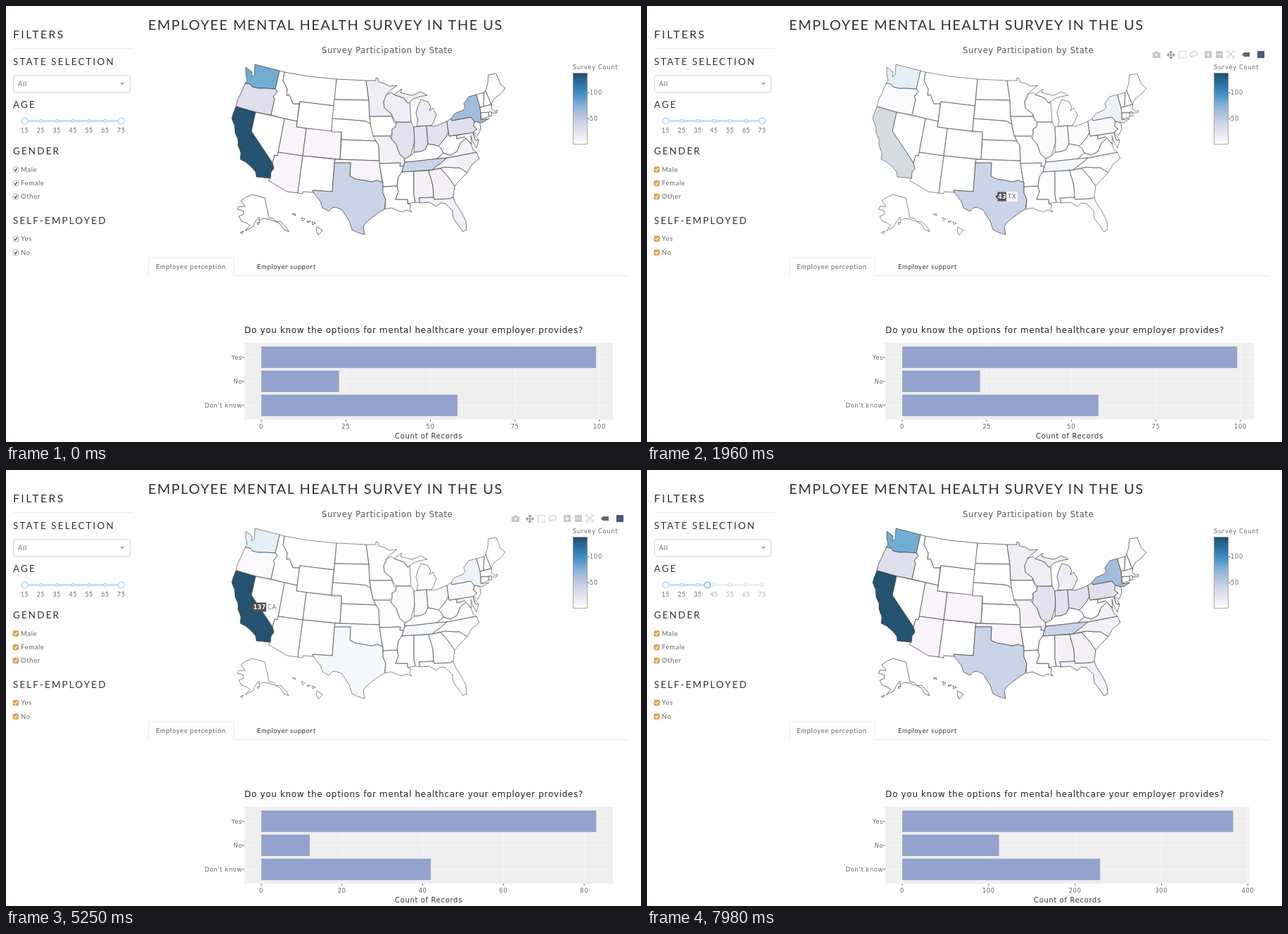
An HTML page for the animation above (8000 ms loop, 903 px wide and 620 px high).

```html
<!DOCTYPE html>
<html lang="en">
<head>
<meta charset="utf-8">
<title>Employee mental health survey</title>
<style>
  html, body { margin: 0; width: 100%; height: 100%; overflow: hidden; background: #fff; }
  svg { display: block; width: 903px; height: 620px; }
  text { font: 9.5px Lato, sans-serif; letter-spacing: .62px; fill: #666; }
  .title { font-size: 20px; letter-spacing: 1.48px; fill: #333; }
  .filters { font-size: 16px; letter-spacing: 2.3px; fill: #333; }
  .head { font-size: 13.5px; letter-spacing: 2.1px; fill: #333; }
  .mark { font-size: 8.5px; text-anchor: middle; }
  .plot, .plot text { font: 8.3px "DejaVu Sans", sans-serif; letter-spacing: .66px; }
  .plot .big { font-size: 12px; fill: #222; }
  .plot .mid { font-size: 10px; fill: #333; text-anchor: middle; }
  .end { text-anchor: end; }
  .center { text-anchor: middle; }
  #states { stroke: #444; stroke-width: .75; stroke-linejoin: round; fill: #fff; }
  #states .dim { stroke: #666; fill-opacity: .2; }
  .low { fill: #f8f4fa; }
  .some { fill: #f4f0f7; }
  .mild { fill: #efedf5; }
  .more { fill: #e3e1ef; }
  .high { fill: #c9d4e8; }
  #tools { fill: #c9c9c9; stroke: #c9c9c9; }
</style>
</head>
<body>
<svg viewBox="0 0 903 620">
  <defs>
    <linearGradient id="scale" x1="0" y1="1" x2="0" y2="0">
      <stop stop-color="#fff9fc"/><stop offset=".14" stop-color="#ece7f2"/>
      <stop offset=".3" stop-color="#cfd3e8"/><stop offset=".44" stop-color="#aac0dd"/>
      <stop offset=".58" stop-color="#78abd0"/><stop offset=".71" stop-color="#3f8fc1"/>
      <stop offset=".83" stop-color="#2d75a8"/><stop offset="1" stop-color="#1f4f6c"/>
    </linearGradient>
  </defs>

  <!-- Sidebar -->
  <text class="title" x="202" y="34">EMPLOYEE MENTAL HEALTH SURVEY IN THE US</text>
  <text class="filters" x="10" y="46">FILTERS</text>
  <path d="M10 60.5H181" stroke="#eee"/>
  <text class="head" x="10" y="84">STATE SELECTION</text>
  <rect x="10.5" y="98.5" width="166" height="24" rx="3" fill="#fff" stroke="#d4d4d4"/>
  <text x="17" y="113.5">All</text>
  <path d="M162 109h7l-3.500 3.500z" fill="#aaa"/>
  <text class="head" x="10" y="144.500">AGE</text>
  <g id="slider"></g>
  <text class="head" x="10" y="211">GENDER</text>
  <text class="head" x="10" y="309.500">SELF-EMPLOYED</text>
  <g id="checks"></g>

  <!-- Map -->
  <text class="plot" x="449" y="67" style="font-size:11.5px;fill:#555">Survey Participation by State</text>
  <g id="states">
    <path id="WA" fill="#70add1" d="M341 87 350 94 349 101 353 98 354 83 389 92 383 118 370 117 358 117 350 115 347 111 340 110 343 106 341 97z"/>
    <path id="OR" fill="#dfdeec" d="M340 110 347 111 350 115 358 117 370 117 383 118 386 122 380 129 382 132 377 155 355 151 327 143 329 134 334 124z"/>
    <path id="CA" fill="#235370" d="M327 143 355 151 349 178 379 223 381 231 377 236 376 245 356 243 355 236 349 229 341 222 333 218 334 209 330 198 330 190 326 181 325 170 321 160 323 153z"/>
    <path d="M355 151 396 160 387 209 386 213 382 212 379 223 349 178z"/>
    <path d="M389 92 396 94 394 106 400 118 399 127 403 126 408 139 417 139 414 164 396 160 377 155 382 132 380 129 386 122 383 118z"/>
    <path d="M396 94 430 100 470 104 467 142 418 136 417 139 408 139 403 126 399 127 400 118 394 106z"/>
    <path d="M418 136 467 142 463 179 413 172z"/>
    <path class="low" d="M396 160 414 164 413 172 427 174 422 213 387 208z"/>
    <path class="low" d="M427 174 477 179 475 218 422 213z"/>
    <path class="low" d="M387 208 422 213 415 266 400 264 373 248 376 245 377 236 381 231 379 223 382 212 386 213z"/>
    <path d="M422 213 468 218 467 223 464 264 436 262 437 265 422 264 422 267 415 266z"/>
    <path d="M470 104 512 106 516 134 467 133z"/>
    <path d="M467 133 516 134 517 157 519 168 512 164 505 163 464 160z"/>
    <path d="M464 160 505 163 512 164 519 168 522 182 526 192 477 190 477 179 463 179z"/>
    <path d="M477 190 526 192 530 198 531 220 475 218z"/>
    <path class="low" d="M468 218 531 220 532 230 535 251 528 248 519 250 509 248 497 246 489 242 490 223 467 223z"/>
    <path id="TX" class="high" d="M467 223 490 223 489 242 497 246 509 248 519 250 528 248 536 251 536 266 540 275 538 289 531 293 520 301 511 309 508 314 510 325 500 322 492 318 488 306 478 290 469 286 464 287 459 292 450 287 447 278 437 265 436 262 464 264z"/>
    <path class="mild" d="M512 106 526 106 526 102 529 103 530 108 538 110 545 114 556 113 548 119 541 126 541 131 537 136 538 145 549 154 549 157 517 157 516 134z"/>
    <path d="M517 157 549 157 551 163 555 168 554 172 549 175 549 182 546 185 522 185 519 172z"/>
    <path class="some" d="M522 185 546 185 548 189 555 197 557 203 560 211 567 217 567 222 565 228 560 228 561 223 531 224 530 198 526 192z"/>
    <path d="M531 224 561 223 560 228 565 228 563 236 558 243 556 256 536 257 536 251 535 248z"/>
    <path d="M536 257 556 256 558 264 554 275 571 275 571 281 576 283 574 288 577 293 570 290 563 293 555 290 548 287 539 289 540 275 536 266z"/>
    <path d="M563 236 580 235 580 268 582 279 572 281 571 275 554 275 558 264 556 256 558 243z"/>
    <path class="some" d="M580 235 601 234 607 255 608 272 587 273 589 280 582 279 580 268z"/>
    <path id="TN" class="high" d="M567 222 578 221 613 217 627 216 619 223 611 229 606 233 563 236z"/>
    <path d="M567 217 575 213 580 208 589 207 596 204 600 196 606 197 615 199 619 203 622 209 613 217 578 221 567 222z"/>
    <path class="more" d="M555 165 576 165 580 172 581 193 578 204 575 213 570 216 567 217 560 211 557 203 555 197 548 189 549 182 549 175 554 172z"/>
    <path class="more" d="M580 172 598 170 600 196 596 204 589 207 580 208 581 193z"/>
    <path class="more" d="M598 170 609 171 618 168 627 164 629 180 626 186 619 195 615 199 606 197 600 196z"/>
    <path class="mild" d="M541 126 548 123 552 126 566 131 571 138 574 135 575 150 576 165 555 165 549 157 549 154 538 145 537 136z"/>
    <path class="mild" d="M552 126 563 118 561 123 568 125 578 127 590 122 599 127 588 129 579 132 573 138 571 138 566 131z"/>
    <path class="mild" d="M590 133 600 136 604 143 602 149 607 145 612 155 608 165 605 170 584 171 586 163 583 152 586 142z"/>
    <path class="some" d="M601 234 618 231 628 242 638 256 636 272 631 274 609 275 608 272 607 255z"/>
    <path class="some" d="M587 273 608 272 609 275 631 274 636 272 639 280 648 294 654 306 655 318 650 321 645 314 636 302 635 291 625 281 618 280 612 285 602 279 589 280z"/>
    <path d="M618 231 624 229 637 230 645 230 656 237 645 248 638 256 628 242z"/>
    <path class="some" d="M627 216 669 208 673 217 662 226 656 237 645 230 637 230 624 229 606 233 611 229 619 223z"/>
    <path class="some" d="M613 217 622 209 632 212 641 207 646 195 654 188 661 196 664 204 669 208 627 216z"/>
    <path d="M615 199 619 195 626 186 629 180 630 185 641 184 641 189 652 186 654 188 646 195 641 207 632 212 622 209 619 203z"/>
    <path d="M641 184 664 180 667 190 672 191 669 202 664 193 661 184 662 196 654 188 652 186 641 189z"/>
    <path d="M664 180 670 188 672 191 667 190z"/>
    <path id="PA" fill="#dfdfee" d="M627 164 633 160 634 163 661 158 666 164 665 171 670 175 664 180 630 185z"/>
    <path d="M666 164 674 166 675 175 671 184 665 179 670 175 665 171z"/>
    <path id="NY" fill="#a2bddb" d="M633 160 638 153 650 148 653 144 651 139 658 129 669 126 674 144 675 152 675 162 687 160 677 166 666 164 661 158 634 163z"/>
    <path d="M669 126 680 123 679 143 674 144z"/>
    <path d="M680 123 682 120 690 140 679 143z"/>
    <path d="M682 120 685 110 686 98 692 97 697 96 703 111 710 117 703 125 694 132 690 140z"/>
    <path d="M674 144 691 140 690 146 695 150 699 148 698 152 690 152 675 152z"/>
    <path d="M675 152 686 151 687 157 676 161z"/>
    <path d="M686 151 690 150 691 156 687 157z"/>
    <path d="M368 273 374 301 380 302 385 307 390 306 399 315 402 321 395 318 390 310 382 306 373 303 365 302 360 306 360 300 355 306 351 314 340 320 347 312 341 308 335 306 331 299 338 296 337 291 329 289 331 285 340 285 334 277 341 272 350 268z"/>
    <path d="M333 322 338 320 336 324zM357 308 361 307 358 311zM407 296 411 295 412 298zM420 301 425 303 422 306zM428 306 433 306 429 308zM435 307 440 309 436 311zM442 314 450 319 444 326 441 319z"/>
  </g>
  <g class="plot">
    <text x="806" y="90">Survey Count</text>
    <rect x="806.500" y="95.500" width="20" height="101" fill="url(#scale)" stroke="#777" stroke-width=".6"/>
    <path d="M827 123.500h3M827 160.500h3" stroke="#777"/>
    <text x="830" y="126">100</text><text x="830" y="163">50</text>
  </g>
  <g id="tools" stroke-width="1.200">
    <path stroke="none" d="M719 66h3l1-2h3l1 2h3v8h-11z"/><circle cx="724.500" cy="70" r="2" fill="#fff"/>
    <path stroke="#888" d="M740 69.500h10M745 64.500v10M742 67.500l-2 2 2 2M748 67.500l2 2-2 2M743 66.500l2-2 2 2M743 72.500l2 2 2-2" fill="none"/>
    <rect x="756.500" y="64.500" width="9.500" height="9.500" fill="none" stroke-dasharray="2 1"/>
    <path d="M774 72c-4-3 0-7 4-7 6 0 6 6 0 6-4 0-4 0-3 3" fill="none"/>
    <path stroke="none" d="M793 64h10v10h-10zM809 64h10v10h-10z"/>
    <path stroke="#fff" d="M795 69h6M798 66v6M811 69h6"/>
    <path fill="none" d="M825 67v-3h3M832 64h3v3M835 71v3h-3M828 74h-3v-3M827 66l6 6M833 66l-6 6"/>
    <path fill="#666" stroke="none" d="M846 69l3-3h8v6h-8z"/>
    <rect x="868" y="64" width="10" height="10" fill="#485a85" stroke="none"/>
  </g>
  <g id="hover" class="plot"></g>

  <!-- Tabs -->
  <path d="M202.500 383V357.500H324V383.500H886" fill="none" stroke="#ececec"/>
  <text x="213" y="374">Employee perception</text>
  <text x="357" y="374" style="fill:#333">Employer support</text>

  <!-- Bar chart -->
  <g class="plot">
    <text class="big" x="339" y="465">Do you know the options for mental healthcare your employer provides?</text>
    <g id="chart"></g>
  </g>
</svg>
<script>
const $ = id => document.getElementById(id);
const LOOP = 8000;

// Each entry holds from its time until the next one.
const selections = [[0, null], [1700, ["TX"]], [3150, ["TX", "CA"]], [4500, ["CA"]], [5950, null]];
const hovers = [[0, null], [1500, "TX"], [2500, null], [2900, "CA"], [5900, null]];
const charts = [
  [0, { bars: [99, 23, 58], step: 25, unit: 4.81, right: 863, mid: 601 }],
  [4900, { bars: [83, 12, 42], step: 20, unit: 5.74, right: 863, mid: 601 }],
  [6600, { bars: [383, 112, 229], step: 100, unit: 1.2285, right: 857, mid: 598 }]
];
const labels = {
  TX: { x: 495, y: 271, count: 43, width: 13 },
  CA: { x: 347, y: 195, count: 137, width: 20 }
};
const at = (track, t) => track.filter(([start]) => start <= t).pop()[1];

function drawSlider(age) {
  const x = value => 26.5 + (value - 15) * 2.29;
  const line = (end, color) =>
    `<path d="M26.5 163.500H${end}" stroke="${color}" stroke-width="2.600"/>`;
  let out = line(164, "#ececec") + line(x(age), "#b5e3f9");
  for (let mark = 15; mark <= 75; mark += 10) {
    const on = mark <= age;
    out += `<circle cx="${x(mark)}" cy="163.500" r="2" fill="#fff" stroke="${on ? "#a8def8" : "#e6e6e6"}" stroke-width="1.300"/>
      <text class="mark" x="${x(mark)}" y="180" style="fill:${on ? "#666" : "#aaa"}">${mark}</text>`;
  }
  for (const value of [15, age]) {
    const active = value > 15 && age < 75;
    out += `<circle cx="${x(value)}" cy="163.500" r="4.300" fill="#fff" stroke="${active ? "#6fc3ec" : "#a8def8"}" stroke-width="1.500"/>`;
  }
  return out;
}

function drawChecks(focused) {
  const [fill, edge, tick] = focused ? ["#e2a440", "#d2983c", "#fff"] : ["#fff", "#999", "#333"];
  return [["Male", 232.5], ["Female", 252], ["Other", 271], ["Yes", 331], ["No", 350.5]].map(([name, y]) =>
    `<rect x="10.200" y="${y - 3.7}" width="7.500" height="7.500" rx="1.500" fill="${fill}" stroke="${edge}" stroke-width=".8"/>
     <path d="M12 ${y}l1.500 2 2.500-4" fill="none" stroke="${tick}" stroke-width="1.200"/>
     <text x="21" y="${y + 3.2}">${name}</text>`).join("");
}

function drawHover(name) {
  if (!name) return "";
  const { x, y, count, width } = labels[name];
  const edge = x + 3 + width;
  return `<rect x="${edge}" y="${y - 7}" width="16" height="14" fill="#fff" fill-opacity=".8"/>
    <path d="M${x} ${y}l3.500-3v-3.500H${edge}v13H${x + 3.5}v-3.500z" fill="#505050"/>
    <text class="center" x="${x + 3.5 + width / 2}" y="${y + 3}" style="fill:#fff;font-weight:bold;letter-spacing:.2px">${count}</text>
    <text x="${edge + 2}" y="${y + 3}">${name}</text>`;
}

function drawChart({ bars, step, unit, right, mid }) {
  let out = `<rect x="339" y="479" width="${right - 339}" height="109" fill="#efefef"/>`;
  for (let value = 0, x = 363; x < right; value += step, x = 363 + value * unit) {
    out += `<path d="M${x} 479V588" stroke="#f7f7f7"/><path d="M${x} 588v3" stroke="#777"/>
      <text class="center" x="${x}" y="601">${value}</text>`;
  }
  ["Yes", "No", "Don't know"].forEach((name, i) => {
    const y = 499.5 + i * 34.2;
    out += `<path d="M339 ${y}H${right}" stroke="#f9f9f9"/><path d="M335.500 ${y}h3.500" stroke="#777"/>
      <rect x="363" y="${y - 15.3}" width="${bars[i] * unit}" height="30.600" fill="#92a3cd"/>
      <text class="end" x="336" y="${y + 3}">${name}</text>`;
  });
  return out + `<text class="mid" x="${mid}" y="615">Count of Records</text>`;
}

function frame(now) {
  const t = now % LOOP;
  const selected = at(selections, t);
  for (const state of $("states").children) {
    state.classList.toggle("dim", selected !== null && !selected.includes(state.id));
  }
  const drag = Math.min(1, Math.max(0, (t - 6950) / 1000));
  $("slider").innerHTML = drawSlider(Math.round(75 - 34 * drag));
  $("checks").innerHTML = drawChecks(t >= 1300);
  $("tools").style.display = t >= 1350 && t < 6200 ? "" : "none";
  $("hover").innerHTML = drawHover(at(hovers, t));
  $("chart").innerHTML = drawChart(at(charts, t));
  requestAnimationFrame(frame);
}
requestAnimationFrame(frame);
</script>
</body>
</html>
```
